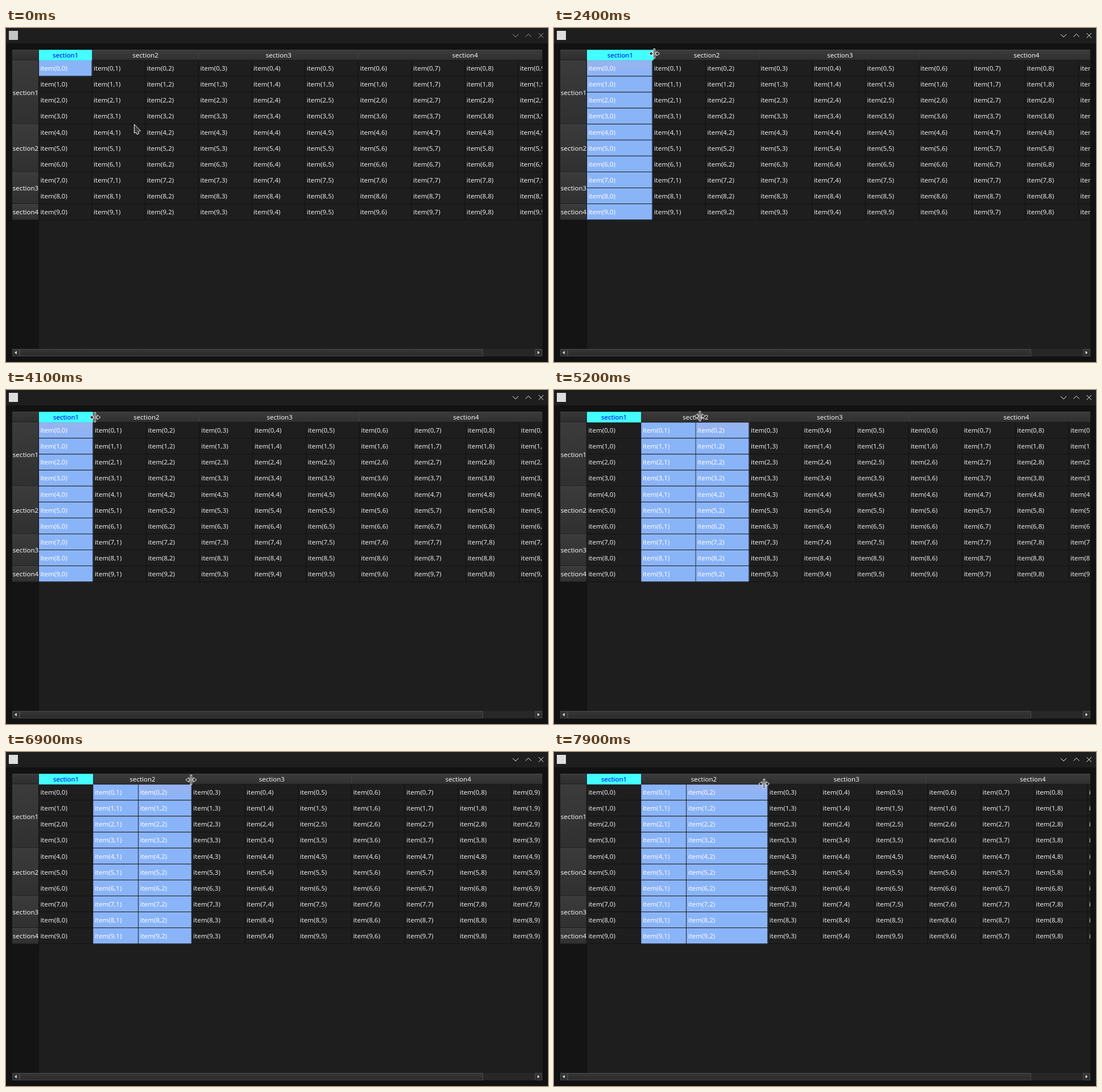
An HTML page with a canvas for the animation above (8000 ms loop, 953 by 588 pixels).

```html
<!DOCTYPE html>
<html>
<head>
<meta charset="utf-8">
<style>
html, body { margin: 0; width: 100%; height: 100%; overflow: hidden; background: #121212; }
canvas { display: block; }
</style>
</head>
<body>
<canvas id="stage" width="953" height="588"></canvas>
<script>
const ctx = document.getElementById('stage').getContext('2d', { alpha: false });
const LOOP = 8000, STEP = 100;
const SCALE = 0.9367, COL = 100 * SCALE, ROW = 30 * SCALE;
const LEFT = 57.8, TOP = 57.1, RIGHT = 943, HEAD = 38.4;
const COL_SPANS = [1, 2, 3, 4], ROW_SPANS = [4, 3, 2, 1];
const ACCENT = '#8ab4f8', LINE = '#111111';

// Moves are [start, end, target...]; each column drag grows, then shrinks.
const drags = [
  [[2000, 2900, 146], [3200, 3800, 95.5]],
  [[5100, 5600, 119.7], [5600, 6100, 79.8]],
  [[7100, 7700, 150], [7800, 8200, 106]]
];
// Pointer path without the distance covered by drags.
const path0 = [225.5, 169.5];
const walk = [
  [100, 800, 183.5, 71.5], [1100, 1300, 153.5, 77.5], [1400, 1700, 151, 45],
  [4000, 4500, 185, 74], [4500, 4900, 249.7, 46],
  [6100, 6600, 329, 49], [6800, 6900, 337.5, 49], [7100, 7900, 337.5, 56]
];

function ease(p) {
  p = Math.min(1, Math.max(0, p));
  return p * p * (3 - 2 * p);
}

function follow(value, moves, t, i = 2) {
  return moves.reduce((v, m) => v + (m[i] - v) * ease((t - m[0]) / (m[1] - m[0])), value);
}

function edges(sizes, start) {
  return sizes.reduce((list, size) => [...list, list[list.length - 1] + size], [start]);
}

const columnWidths = t => Array.from({ length: 10 }, (_, c) => follow(COL, drags[c] || [], t));
const columnEdges = t => edges(columnWidths(t), LEFT);

function rect(x, y, w, h, fill) {
  ctx.fillStyle = fill;
  ctx.fillRect(x, y, w, h);
}

function shade(y, h, from, to) {
  const g = ctx.createLinearGradient(0, y, 0, y + h);
  g.addColorStop(0, from);
  g.addColorStop(1, to);
  return g;
}

function path(points, stroke, fill) {
  ctx.beginPath();
  points.forEach(([x, y]) => ctx.lineTo(x, y));
  if (fill) {
    ctx.closePath();
    ctx.fillStyle = fill;
    ctx.fill();
  }
  ctx.strokeStyle = stroke;
  ctx.stroke();
}

function text(s, x, y, color, align = 'left') {
  ctx.fillStyle = color;
  ctx.textAlign = align;
  ctx.fillText(s, x, y);
}

function titleBar(active) {
  rect(0, 0, 953, 27, '#1e1e1e');
  rect(5, 5, 16, 16, active ? '#dedede' : '#c4c4c4');
  const color = active ? '#f0f0f0' : '#a0a0a0';
  path([[891, 11], [896, 16], [901, 11]], color);
  path([[913.5, 15.5], [918.5, 10.5], [923.5, 15.5]], color);
  path([[936.5, 9], [945, 17.5]], color);
  path([[945, 9], [936.5, 17.5]], color);
}

function cells(x, t) {
  const active = t >= 2100, current = t < 5200 ? 0 : 2;
  const selected = (r, c) => !active ? r + c === 0 : current ? c === 1 || c === 2 : c === 0;
  for (let c = 0; c < 10; c++) {
    for (let r = 0; r < 10; r++) {
      const y = TOP + r * ROW, on = selected(r, c);
      if (on) {
        const glow = active && r === 0 && c === current;
        rect(x[c], y, x[c + 1] - x[c], ROW, glow ? shade(y, ROW, '#98b3ee', ACCENT) : ACCENT);
      }
      text(`item(${r},${c})`, x[c] + 2.6, y + 18, on ? '#ffffff' : '#e8eaed');
    }
    rect(x[c + 1] - SCALE, TOP, SCALE, 10 * ROW, LINE);
  }
  for (let r = 1; r <= 10; r++) rect(LEFT, TOP + r * ROW - SCALE, RIGHT - LEFT, SCALE, LINE);
}

function columnHeader(x) {
  const h = TOP - HEAD;
  let c = 0;
  COL_SPANS.forEach((span, i) => {
    const a = x[c], b = x[c += span];
    rect(a, HEAD, b - a, h, i ? shade(HEAD, h, '#3b3b3b', '#303030') : '#43fdff');
    if (i) {
      rect(a, HEAD, b - a, SCALE, '#484848');
      rect(b - SCALE, HEAD + 1, SCALE, h - 2, '#4a4a4a');
      rect(a, TOP - SCALE, b - a, SCALE, '#181818');
    }
    text('section' + (i + 1), (a + b) / 2, 52, i ? '#f4f4f4' : '#0000f0', 'center');
  });
}

function rowHeader() {
  const w = LEFT - 11;
  rect(11, HEAD, w, TOP - HEAD, shade(HEAD, TOP - HEAD, '#383838', '#2e2e2e'));
  rect(11, HEAD, w, SCALE, '#444444');
  rect(11, TOP - SCALE, w, SCALE, '#181818');
  rect(11, TOP, w, 565 - TOP, '#141414');
  let y = TOP;
  ROW_SPANS.forEach((span, i) => {
    const h = span * ROW;
    rect(11, y, w - SCALE, h, shade(y, h, '#3b3b3b', '#303030'));
    rect(11, y, w - SCALE, SCALE, '#474747');
    rect(11, y + h - SCALE, w - SCALE, SCALE, '#1a1a1a');
    text('section' + (i + 1), 34.5, y + h / 2 + 4.3, '#f4f4f4', 'center');
    y += h;
  });
}

function scrollBar() {
  rect(11, 565, 932, 13, '#272727');
  for (const [x, w] of [[11, 13], [24, 815], [930, 13]]) {
    rect(x, 565, w, 13, '#484848');
    rect(x + 1, 566, w - 2, 11, shade(566, 11, '#363636', '#2b2b2b'));
  }
  for (const [x, side] of [[17, -1], [936.5, 1]]) {
    path([[x - side * 1.5, 569.2], [x + side * 1.5, 571.5], [x - side * 1.5, 573.8]], '#d0d0d0', '#d0d0d0');
  }
}

function drawPointer(t, x) {
  // The hand runs slightly ahead of the column it drags.
  const dragged = columnWidths(t + 40).reduce((sum, w) => sum + w - COL, 0);
  const px = follow(path0[0], walk, t, 2) + dragged, py = follow(path0[1], walk, t, 3);
  const resizing = py < TOP && x.some(edge => Math.abs(edge - px) < 9);
  ctx.save();
  ctx.translate(px, py);
  if (resizing) {
    for (const s of [-1, 1]) {
      path([[s * 9.5, 0], [s * 4, -4], [s * 4, -1.2], [s * 1.5, -1.2],
        [s * 1.5, 1.2], [s * 4, 1.2], [s * 4, 4]], '#f4f4f4', '#303030');
    }
    path([[-1.3, -8.5], [1.3, -8.5], [1.3, 8.5], [-1.3, 8.5]], '#f4f4f4', '#303030');
  } else {
    path([[0, 0], [0, 15.5], [3.2, 14.2], [5, 18], [8, 16.7], [7.2, 13], [11, 11.5]], '#f0f0f0', '#3f3f3f');
  }
  ctx.restore();
}

function draw(t) {
  const x = columnEdges(t);
  ctx.font = '11.5px "Noto Sans", sans-serif';
  rect(0, 0, 953, 588, '#121212');
  titleBar(t >= 2100);
  rect(LEFT, TOP, RIGHT - LEFT, 565 - TOP, '#1e1e1e');
  ctx.save();
  ctx.beginPath();
  ctx.rect(LEFT, 38, RIGHT - LEFT, 527);
  ctx.clip();
  cells(x, t);
  columnHeader(columnEdges(t + 20)); // the header repaints before the cells
  ctx.restore();
  rowHeader();
  scrollBar();
  drawPointer(t, x);
}

function tick() {
  draw(Math.floor(performance.now() % LOOP / STEP) * STEP);
  requestAnimationFrame(tick);
}
tick();
</script>
</body>
</html>
```
